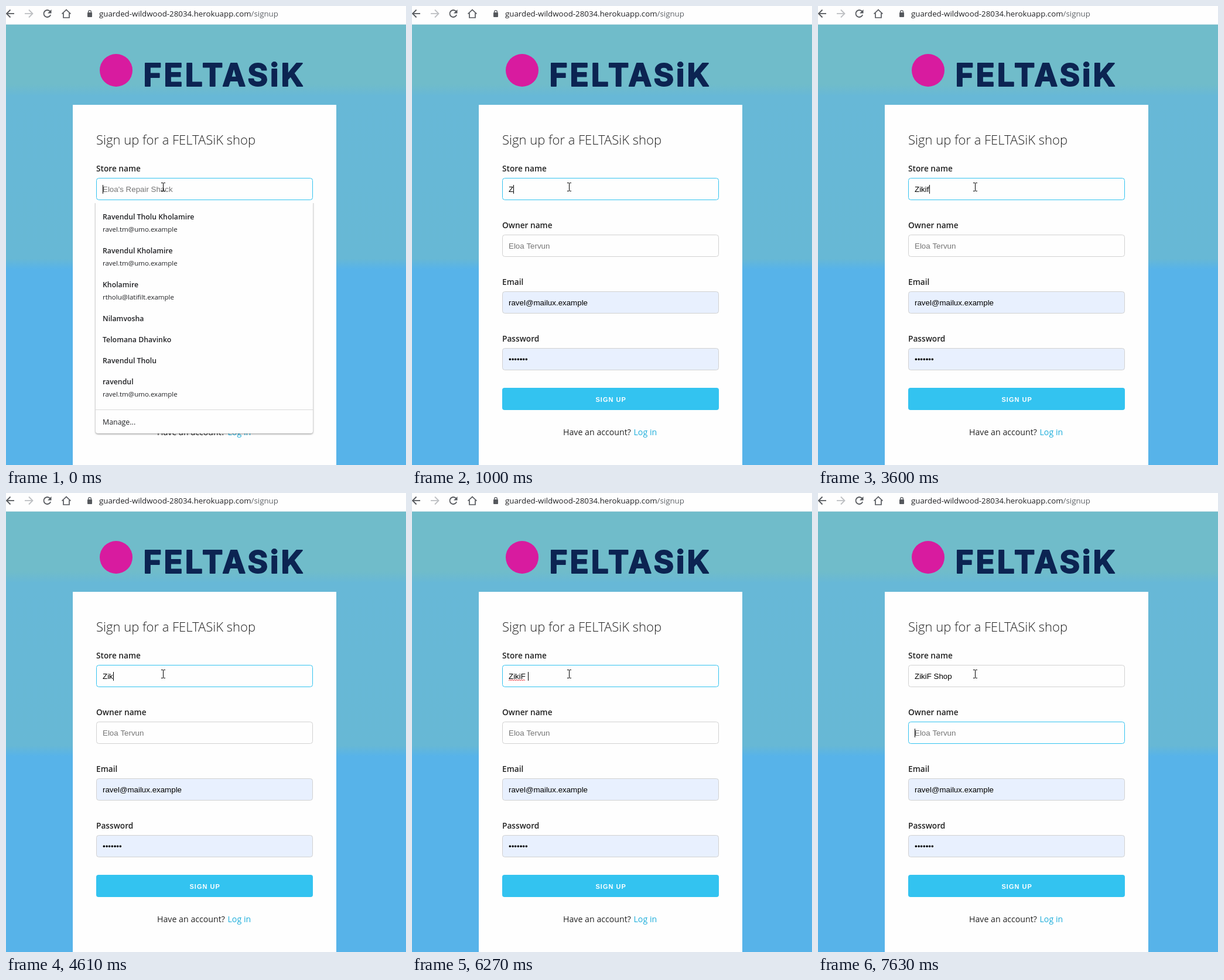
These frames come from a looping animation (683 by 785 pixels, 8000 ms). An HTML page with a canvas:

```html
<!DOCTYPE html>
<html lang="en">
<head>
<meta charset="utf-8">
<title>Shop sign-up</title>
<style>
  html, body { margin: 0; width: 100%; height: 100%; overflow: hidden; background: #fff; }
  canvas { display: block; }
</style>
</head>
<body>
<canvas id="stage" width="683" height="785"></canvas>
<script>
const ctx = document.getElementById('stage').getContext('2d');
const LOOP = 8000;
const UI = '"Open Sans", "Noto Sans", sans-serif';
const FIELD_FONT = '13.333px "Liberation Sans", Arial, sans-serif';
const BRAND = 'FELTASiK';
const ACCENT = '#33c3f0';
const INK = '#222';
const LEFT = 154;
const TEXT_X = 165;

// [start ms, typed text, caret visible]
const TYPING = [
  [0, '', true], [150, '', false], [750, '', true],
  [1000, 'Z', true], [1150, 'Zi', true], [1680, 'Zi', false],
  [1980, 'Zik', true], [2550, 'Zik', false],
  [2940, 'Ziki', true], [3480, 'Ziki', false],
  [3600, 'Zikif', true], [4190, 'Zikif', false],
  [4340, 'Ziki', false], [4460, 'Zik', false], [4610, 'Zik', true], [5160, 'Zik', false],
  [5320, 'Ziki', true], [5480, 'ZikiF', true], [6020, 'ZikiF', false],
  [6270, 'ZikiF ', true], [6670, 'ZikiF S', true], [6790, 'ZikiF Sh', true],
  [7350, 'ZikiF Sho', true], [7480, 'ZikiF Shop', true]
];
const MENU_CLOSES = 1000;
const SPELLCHECK = 6270;
const NEXT_FIELD = 7630;

// [name, baseline, email]
const MAIL = 'ravel.tm@umo.example';
const SUGGESTIONS = [
  ['Ravendul Tholu Kholamire', 365, MAIL],
  ['Ravendul Kholamire', 423, MAIL],
  ['Kholamire', 481, 'rtholu@latifilt.example'],
  ['Nilamvosha', 539],
  ['Telomana Dhavinko', 575],
  ['Ravendul Tholu', 611],
  ['ravendul', 647, MAIL]
];

function text(str, x, y, font, color, spacing = 0) {
  ctx.font = font;
  ctx.fillStyle = color;
  ctx.letterSpacing = spacing + 'px';
  ctx.fillText(str, x, y);
  return ctx.measureText(str).width;
}

function rect(x, y, w, h, color) {
  ctx.fillStyle = color;
  ctx.fillRect(x, y, w, h);
}

function roundRect(x, y, w, h, radius, fill, border) {
  ctx.beginPath();
  ctx.roundRect(x, y, w, h, radius);
  ctx.fillStyle = fill;
  ctx.fill();
  if (!border) return;
  ctx.strokeStyle = border;
  ctx.lineWidth = 1;
  ctx.stroke();
}

function line(points, color, width) {
  ctx.beginPath();
  points.forEach(([x, y]) => ctx.lineTo(x, y));
  ctx.strokeStyle = color;
  ctx.lineWidth = width;
  ctx.stroke();
}

function arrow(tip, tail, color) {
  const head = tip + Math.sign(tail - tip) * 6.5;
  line([[tip, 13], [tail, 13]], color, 1.8);
  line([[head, 6.5], [tip, 13], [head, 19.5]], color, 1.8);
}

function drawToolbar() {
  const gray = '#55585d';
  rect(0, 0, 683, 31, '#fefefe');
  rect(0, 31, 683, 1, '#cfe3e8');
  arrow(1, 14, gray);
  arrow(45.5, 32, '#bdbfc2');

  ctx.beginPath();
  ctx.arc(70.5, 13, 6, 0.35, Math.PI * 2 - 0.75);
  ctx.strokeStyle = gray;
  ctx.lineWidth = 1.8;
  ctx.stroke();
  ctx.beginPath();
  ctx.moveTo(77.5, 6);
  ctx.lineTo(77.5, 12.5);
  ctx.lineTo(71, 12.5);
  ctx.fillStyle = gray;
  ctx.fill();

  line([[95.5, 13.5], [103, 6.5], [110.5, 13.5]], gray, 1.7);
  line([[98, 12], [98, 20], [108, 20], [108, 12]], gray, 1.7);

  roundRect(139, 11, 8, 8, 1, gray);
  ctx.beginPath();
  ctx.arc(143, 10, 2.4, Math.PI, 0);
  ctx.lineTo(145.4, 12);
  ctx.moveTo(140.6, 10);
  ctx.lineTo(140.6, 12);
  ctx.lineWidth = 1.3;
  ctx.stroke();

  const font = '13.3px ' + UI;
  const width = text('guarded-wildwood-28034.herokuapp.com', 159, 18, font, '#202124');
  text('/signup', 159 + width, 18, font, '#5f6368');
}

function drawBackdrop() {
  const sky = ctx.createLinearGradient(0, 32, 0, 785);
  const stops = [[32, '#70bcca'], [134, '#70bcca'], [154, '#67b8d7'],
                 [432, '#67b8d5'], [450, '#57b3e9'], [785, '#57b3e9']];
  stops.forEach(([y, color]) => sky.addColorStop((y - 32) / 753, color));
  rect(0, 32, 683, 753, sky);
  rect(114, 169, 450, 616, '#fefefe');

  ctx.beginPath();
  ctx.arc(188, 110, 28, 0, Math.PI * 2);
  ctx.fillStyle = '#d81b9f';
  ctx.fill();

  const navy = '#0c2452';
  text(BRAND, 234.5, 137, '700 53px Inter, sans-serif', navy, 4);
  ctx.strokeStyle = navy;
  ctx.lineWidth = 2;
  ctx.lineJoin = 'round';
  ctx.strokeText(BRAND, 234.5, 137);
  ctx.lineJoin = 'miter';
}

function drawField(label, y, { value = '', hint = '', focused = false, filled = false }) {
  text(label, LEFT, y - 11, '600 13.7px ' + UI, INK);
  roundRect(LEFT + 0.5, y + 0.5, 369, 37, 4,
    filled ? '#e8f0fe' : '#fefefe', focused ? ACCENT : '#d1d1d1');
  text(value || hint, TEXT_X, y + 24, FIELD_FONT, value ? '#000' : '#757575');
}

function drawCaret(value, y) {
  ctx.font = FIELD_FONT;
  ctx.letterSpacing = '0px';
  const x = Math.ceil(TEXT_X + ctx.measureText(value).width - 0.3);
  rect(x, y + 12, 1, 15, '#000');
}

function drawSquiggle() {
  const points = [];
  for (let x = TEXT_X; x <= 193; x += 2) points.push([x, (x - TEXT_X) % 4 ? 319.3 : 320.7]);
  line(points, '#e8383d', 1);
}

function drawForm(t) {
  const [, typed, caretOn] = TYPING.findLast(step => step[0] <= t);
  const onOwner = t >= NEXT_FIELD;

  text(`Sign up for a ${BRAND} shop`, LEFT, 237, '300 22px ' + UI, INK);
  drawField('Store name', 294, { value: typed, hint: "Eloa's Repair Shack", focused: !onOwner });
  drawField('Owner name', 391, { hint: 'Eloa Tervun', focused: onOwner });
  drawField('Email', 488, { value: 'ravel@mailux.example', filled: true });
  drawField('Password', 585, { value: '•'.repeat(7), filled: true });

  if (onOwner) drawCaret('', 391);
  else if (caretOn) drawCaret(typed, 294);
  if (t >= SPELLCHECK && !onOwner) drawSquiggle();

  roundRect(LEFT, 653, 370, 38, 4, ACCENT);
  text('SIGN UP', 313.5, 677, 'bold 11px "Liberation Sans", Arial, sans-serif', '#fff', 1);
  text('Have an account?', 258, 734, '14.2px ' + UI, INK);
  text('Log in', 378.5, 734, '14.2px ' + UI, '#1eaedb');
}

function drawMenu() {
  ctx.save();
  ctx.beginPath();
  ctx.rect(148, 337, 382, 402);
  ctx.clip();
  ctx.shadowColor = 'rgba(0, 0, 0, 0.45)';
  ctx.shadowBlur = 3;
  ctx.shadowOffsetY = 1;
  roundRect(153, 333, 371, 398, 4, '#fefefe');
  ctx.restore();

  for (const [name, y, email] of SUGGESTIONS) {
    text(name, TEXT_X, y, '600 12.3px ' + UI, '#202124');
    if (email) text(email, TEXT_X, y + 21, '11.5px ' + UI, '#202124');
  }
  rect(153, 690, 371, 1, '#dadada');
  text('Manage...', TEXT_X, 716, '12.4px ' + UI, '#202124');
}

function drawPointer() {
  rect(268, 303, 1, 13, '#000');
  for (const y of [302, 316]) {
    rect(265, y, 3, 1, '#000');
    rect(269, y, 3, 1, '#000');
  }
}

function render(now) {
  const t = now % LOOP;
  drawBackdrop();
  drawToolbar();
  drawForm(t);
  if (t < MENU_CLOSES) drawMenu();
  drawPointer();
}

const start = performance.now();
function tick() {
  render(performance.now() - start);
  requestAnimationFrame(tick);
}
tick();
</script>
</body>
</html>
```
